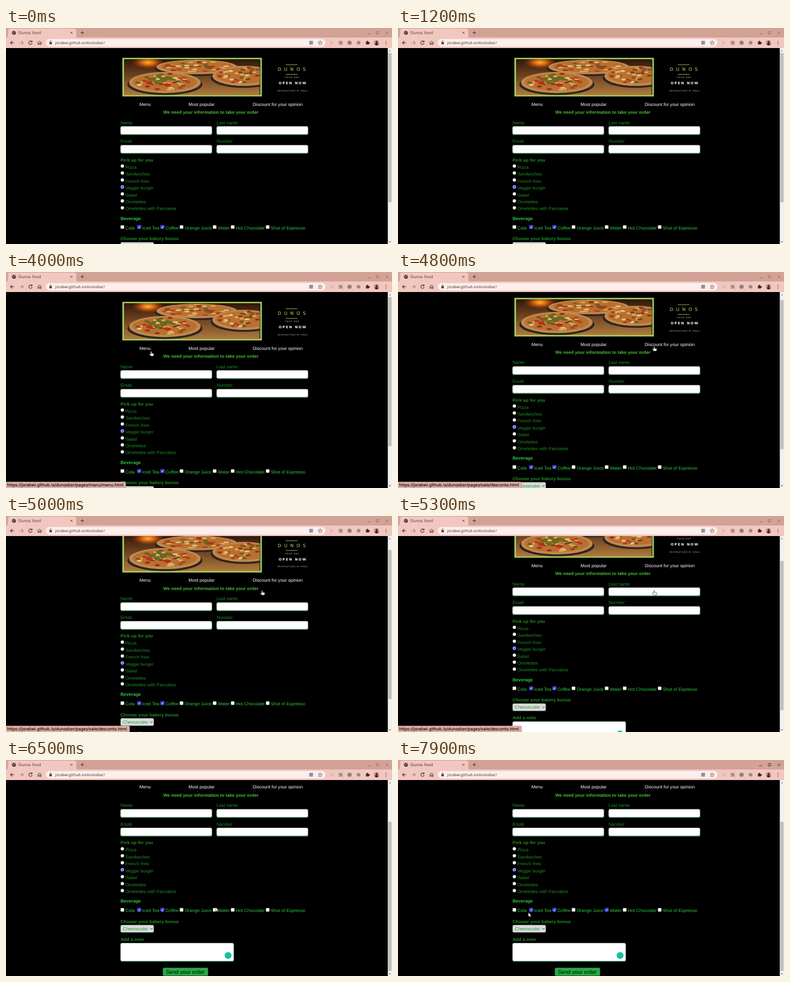
Write an HTML page that moves like this. It is 690 px wide and 388 px high and loops after 8 s.

```html
<!DOCTYPE html>
<html lang="en">
<head>
<meta charset="utf-8">
<title>Dunos food</title>
<style>
  html, body { margin: 0; width: 100%; height: 100%; overflow: hidden; background: #000; }
  svg { display: block; width: 690px; height: 388px; }
  text { font: 8.08px "Liberation Sans", Arial, sans-serif; text-rendering: geometricPrecision; white-space: pre; }
  .b { font-weight: 700; }
  .ui { font-family: "DejaVu Sans", sans-serif; font-size: 7.1px; }
  .url { font-family: "Open Sans", sans-serif; font-size: 6.8px; }
  .brand { font-family: "DejaVu Sans", sans-serif; }
</style>
</head>
<body>
<svg id="stage" viewBox="0 0 690 388" xmlns="http://www.w3.org/2000/svg">
  <defs>
    <clipPath id="view"><rect y="36" width="682.5" height="352"/></clipPath>
    <clipPath id="photoClip"><rect x="211" y="56" width="242.5" height="64.5"/></clipPath>
    <linearGradient id="room" x2="0" y2="1">
      <stop offset="0" stop-color="#2f170c"/><stop offset=".45" stop-color="#6b421f"/>
      <stop offset="1" stop-color="#b17a3e"/>
    </linearGradient>
    <radialGradient id="fire">
      <stop offset="0" stop-color="#ffb52e"/><stop offset=".4" stop-color="#c75a10"/>
      <stop offset="1" stop-color="#5a2408" stop-opacity="0"/>
    </radialGradient>
  </defs>
  <g clip-path="url(#view)"><g id="page"></g></g>
  <g id="scrollbar">
    <rect x="682.5" y="36" width="7.5" height="352" fill="#f1f1f1"/>
    <path d="M684.6 41.800h3.400l-1.700-2z" fill="#777"/>
    <path d="M684.6 383.200h3.400l-1.700 2z" fill="#444"/>
    <rect id="thumb" x="683.400" y="45" width="5.800" height="268" fill="#bfbfbf"/>
  </g>
  <g id="chrome"></g>
  <g id="status">
    <path id="statusBox" fill="#dcaea5" stroke="#b98a82" stroke-width=".5"/>
    <text id="statusText" class="ui" x="2" y="385" fill="#1c1414" stroke="#1c1414" stroke-width=".2"></text>
  </g>
  <g id="cursor" stroke-linejoin="round">
    <path id="arrow" d="M0 0v7.6l1.8-1.6 1.2 2.7 1.3-.6-1.2-2.6h2.4z" fill="#fff" stroke="#222" stroke-width=".5"/>
    <path id="hand" d="M-.8.7Q0-.5.8.7V3.3L4 4q.9.3.8 1.4l-.7 3.1H-.6L-3 5.4q-.2-1.3 1-.9l1.2.9z" fill="#fff" stroke="#222" stroke-width=".6"/>
  </g>
</svg>
<script>
const $ = id => document.getElementById(id);
const text = (x, y, s, fill, cls = '', extra = '') =>
  `<text x="${x}" y="${y}" fill="${fill}" class="${cls}" ${extra}>${s}</text>`;
const rect = (x, y, w, h, fill, r = 0, extra = '') =>
  `<rect x="${x}" y="${y}" width="${w}" height="${h}" rx="${r}" fill="${fill}" ${extra}/>`;
const disc = (x, y, r, fill, extra = '') => `<circle cx="${x}" cy="${y}" r="${r}" fill="${fill}" ${extra}/>`;
const oval = (x, y, rx, ry, fill) => `<ellipse cx="${x}" cy="${y}" rx="${rx}" ry="${ry}" fill="${fill}"/>`;
const line = (d, color, w = 1) => `<path d="${d}" fill="none" stroke="${color}" stroke-width="${w}"/>`;

const GREEN = '#1e8f22', LIME = '#4bbd35', BRIGHT = '#2fc944';

function random(seed) {
  return () => (seed = seed * 16807 % 2147483647) / 2147483647;
}

function pizza(x, y, rx, ry, seed) {
  const rnd = random(seed);
  const colors = ['#b23c1c', '#dba955', '#94301a', '#e6c380', '#6a5a24'];
  let out = oval(x, y + 3.5, rx + 3, ry, '#2f2520') + oval(x, y, rx, ry, '#c08850') +
    oval(x, y - .8, rx * .9, ry * .82, '#b9702f');
  for (let i = 0; i < 45; i++) {
    const a = rnd() * 6.283, d = Math.sqrt(rnd()) * .8;
    out += oval((x + Math.cos(a) * d * rx).toFixed(1), (y - 1 + Math.sin(a) * d * ry).toFixed(1),
      rx * .07, ry * .1, colors[i % 5]);
  }
  return out;
}

function photo() {
  const leaves = [[262, 92, -20], [274, 88, 25], [283, 94, -30], [270, 98, 15], [291, 90, 10]];
  return rect(209.5, 55, 246.5, 66.5, '#000', 0, 'stroke="#a4d45c" stroke-width="2.8"') +
    '<g clip-path="url(#photoClip)">' +
    rect(211, 56, 243, 65, 'url(#room)') +
    oval(254, 62, 32, 13, 'url(#fire)') +
    pizza(341, 70, 72, 13, 17) + pizza(425, 86, 56, 18, 91) + pizza(284, 98, 64, 19, 43) +
    leaves.map(([x, y, a]) =>
      `<ellipse rx="7" ry="2.800" fill="#5c6f20" transform="translate(${x} ${y}) rotate(${a})"/>`).join('') +
    oval(257, 99, 6, 3, '#b8301c') + oval(288, 102, 7, 3, '#b8301c') +
    '</g>';
}

function sign() {
  const words = (x, y, s, fill, size, gap, cls = '') =>
    text(x, y, s, fill, 'brand ' + cls, `text-anchor="middle" style="font-size:${size}px;letter-spacing:${gap}px"`);
  return line('M500 66h21M500 83.300h21', '#c9d27a', .8) +
    words(513.3, 77.4, 'DUNOS', '#c3d268', 8.2, 5) +
    words(511.6, 90.400, 'FOOD BAR', '#ccc', 3.6, .9) +
    words(512.800, 101.300, 'OPEN NOW', '#fff', 6, 1.65, 'b') +
    words(512.800, 113.800, 'RESERVATIONS BY EMAIL', '#ccc', 3.4, .6);
}

const field = (x, y, w, h) =>
  rect(x - .2, y + .5, w + .7, h + .9, '#2f7f59', 2.6) +
  rect(x, y, w, h, '#fff', 2.4, 'stroke="#b5c4bc" stroke-width=".5"');

function radio(label, i) {
  const y = 248 + i * 12.5, on = i === 3;
  return disc(208, y, 3, '#fff', `stroke="${on ? '#3b38e6' : '#777'}" stroke-width="${on ? .9 : .5}"`) +
    (on ? disc(208, y, 1.700, '#3b38e6') : '') +
    text(213.4, 252.700 + i * 12.45, label, GREEN);
}

const tick = (x, id) => `<g id="${id}">` + rect(x - 3.3, 354.2, 6.6, 6.6, '#3b38e6', 1) +
  line(`M${x - 1.8} 357.6l1.4 1.5 2.4-3.2`, '#fff') + '</g>';

function checkbox([x, tx, label, id]) {
  return rect(x - 3.1, 354.4, 6.2, 6.2, '#fff', 1, 'stroke="#777" stroke-width=".5"') +
    (id ? tick(x, id) : '') + text(tx, 361.800, label, BRIGHT);
}

function buildPage() {
  const foods = ['Pizza', 'Sandwiches', 'French fries', 'Veggie burger', 'Salad', 'Omelettes', 'Omelettes with Pancakes'];
  const drinks = [
    [208, 213.3, 'Cola'], [238, 243.6, 'Iced Tea', 'tea'], [279.5, 284.9, 'Coffee', 'coffee'],
    [313.8, 319.4, 'Orange Juice'], [373, 378.8, 'Water', 'water'],
    [405.2, 411, 'Hot Chocolate'], [467.8, 473.4, 'Shot of Espresso']
  ];
  $('page').innerHTML = photo() + sign() +
    text(238.5, 139.700, 'Menu', '#fff') + text(326.3, 139.700, 'Most popular', '#fff') +
    text(441, 139.700, 'Discount for your opinion', '#fff') +
    text(281, 154.1, 'We need your information to take your order', LIME, 'b') +
    text(204.7, 172.6, 'Name', GREEN) + text(376.5, 172.6, 'Last name', GREEN) +
    text(204.7, 206.4, 'Email', GREEN) + text(376.5, 206.4, 'Number', GREEN) +
    [176.8, 210.4].map(y => field(204.900, y, 163, 14) + field(376.700, y, 163, 14)).join('') +
    text(204.7, 239.900, 'Pick up for you', GREEN, 'b') + foods.map(radio).join('') +
    text(204.7, 344.5, 'Beverage', BRIGHT, 'b') + drinks.map(checkbox).join('') +
    text(204.7, 381, 'Choose your bakery bonus', GREEN, 'b') +
    rect(205, 385, 59, 13, '#dcdcdc', 2.2, 'stroke="#8fae98" stroke-width=".7"') +
    text(208.8, 394.3, 'Cheesecake', '#2a9d3c') + line('M257.8 390.6l2 2 2-2', '#333') +
    text(204.7, 413.1, 'Add a note', GREEN, 'b') + field(204.900, 417.3, 202, 32) +
    disc(397, 439.5, 6.2, '#15c39a') +
    rect(280.3, 461.6, 81, 14.4, '#28a745', 2.2) +
    text(286.2, 472.2, 'Send your order', '#000', '', 'style="font-size:9.6px"');
}

function buildChrome() {
  const ink = '#4a3532', bar = '#f1c7bf';
  $('chrome').innerHTML = rect(0, 0, 690, 18, '#d2a297') +
    `<path d="M0 17.5q3.5 0 3.5-4V5q0-4 4-4h114q4 0 4 4v8.5q0 4 3.5 4z" fill="${bar}"/>` +
    rect(0, 17, 690, 19, bar) +
    rect(71, 19.8, 500, 13.4, '#fbeeeb', 6.7) +
    disc(14.2, 8.5, 3.6, '#3d3432') + line('M11.2 7.2q2 .2 2.4 1.5t-1 2M14.6 5.5q-.8 1.5 2.6 2.3', bar, .9) +
    `<g id="title">${text(22, 11.1, 'Dunos food', ink, 'ui')}</g>` +
    line('M115.2 6.7l3.6 3.6m0-3.6l-3.6 3.6', ink, .9) + line('M133.4 8.5h6m-3-3v6', ink) +
    line('M14.5 26.5h-6.5m3-3l-3 3 3 3', ink, 1.1) +
    line('M24.5 26.5h6.5m-3-3l3 3-3 3', '#ab8680', 1.1) +
    line('M46 24.5a3 3 0 1 0 .6 2.5M46.6 22.8v2.2h-2.2', ink, 1.1) +
    line('M56.4 26.7l3.7-3.3 3.7 3.3M57.6 26v3.6h1.6v-2h1.8v2h1.6v-3.6', ink) +
    rect(77.6, 25.6, 4.4, 3.6, ink, .5) + line('M78.5 25.6v-1.2a1.3 1.3 0 0 1 2.6 0v1.2', ink, .8) +
    text(88, 28.9, 'jorabwi.github.io/dunosbar/', '#3a2d2b', 'url') +
    rect(542, 23, 6.8, 6.8, '#8a93a8', .8) +
    line('M561.6 22.8l1.1 2.5 2.6.2-2 1.8.6 2.6-2.3-1.4-2.3 1.4.6-2.6-2-1.8 2.6-.2z', ink, .7) +
    disc(581.7, 26.5, 3.3, '#dfbdb7') +
    line('M595 24.2h6.5m-6.5 2.3h6.5m-6.5 2.3h6.5', '#5a4a48', 1.1) +
    disc(614.2, 26.5, 3.7, '#8d7f7d') + disc(630.3, 26.5, 3.3, '#9a8987') +
    rect(643.4, 24.6, 5.4, 5, '#3c2d2b', .6) + disc(645.9, 24.3, 1.3, '#3c2d2b') + disc(649.2, 27, 1.2, '#3c2d2b') +
    disc(662.3, 26.5, 4.8, '#c78e8c') + disc(662.5, 25, 1.7, '#4b1f28') +
    '<path d="M659.5 30.3q.2-3.8 3-3.8t3 3.8q-3 1.8-6 0z" fill="#4b1f28"/>' +
    [23.8, 26.5, 29.2].map(y => disc(679.3, y, .8, ink)).join('') +
    '<g id="controls">' + line('M645.7 10.3h5M662 6.5h4.2v4.2h-4.2zM679 6.5l4.2 4.2m0-4.2l-4.2 4.2', '#3d2a28', .9) + '</g>';
}

// Time in ms followed by values
const scrollKeys = [[4700, 0], [5000, 21.4], [5300, 48], [5700, 80.2], [5900, 88.4]];
const pointerKeys = [
  [2900, 684, 222], [3300, 420, 168], [3500, 262, 144], [3700, 259.5, 142.5], [4000, 259.5, 142.5],
  [4400, 457.8, 133.6], [6000, 457.8, 133.6], [6400, 374.5, 264.5], [7000, 374.5, 264.5], [7600, 233, 274]
];
const LOOP = 8000, STEP = 100, CLICK = 6700;

function at(keys, t) {
  const i = keys.findIndex(k => k[0] > t);
  if (i === 0) return keys[0].slice(1);
  if (i < 0) return keys[keys.length - 1].slice(1);
  const a = keys[i - 1], b = keys[i], p = (t - a[0]) / (b[0] - a[0]);
  return a.slice(1).map((v, n) => v + (b[n + 1] - v) * p);
}

const show = (id, on) => $(id).setAttribute('visibility', on ? 'visible' : 'hidden');
const base = 'https://jorabwi.github.io/dunosbar/pages/';

function render(t) {
  const [scroll] = at(scrollKeys, t), [x, y] = at(pointerKeys, t);
  $('page').setAttribute('transform', `translate(0 ${-scroll})`);
  $('thumb').setAttribute('y', 45 + scroll * .746);

  const onMenu = t >= 3500 && t <= 4000, onSale = t >= 4300 && t < 6000;
  const pointing = t >= 2900;
  $('cursor').setAttribute('transform', `translate(${x} ${y})`);
  show('hand', pointing && (onMenu || onSale));
  show('arrow', pointing && !onMenu && !onSale);

  show('status', t >= 3500 && t < 6000);
  $('statusText').textContent = base + (t < 4300 ? 'menu/menu.html' : 'sale/desconto.html');
  $('statusBox').setAttribute('d', `M-1 377H${t < 4300 ? 212 : 219}q2 0 2 2V389H-1z`);

  const focused = t >= CLICK;
  show('water', focused);
  $('controls').setAttribute('opacity', focused ? 1 : .45);
  $('title').setAttribute('opacity', focused ? 1 : .9);
}

buildPage();
buildChrome();
const start = performance.now();
(function tickFrame() {
  const t = (performance.now() - start) % LOOP;
  render(Math.floor(t / STEP) * STEP);
  requestAnimationFrame(tickFrame);
})();
</script>
</body>
</html>
```
